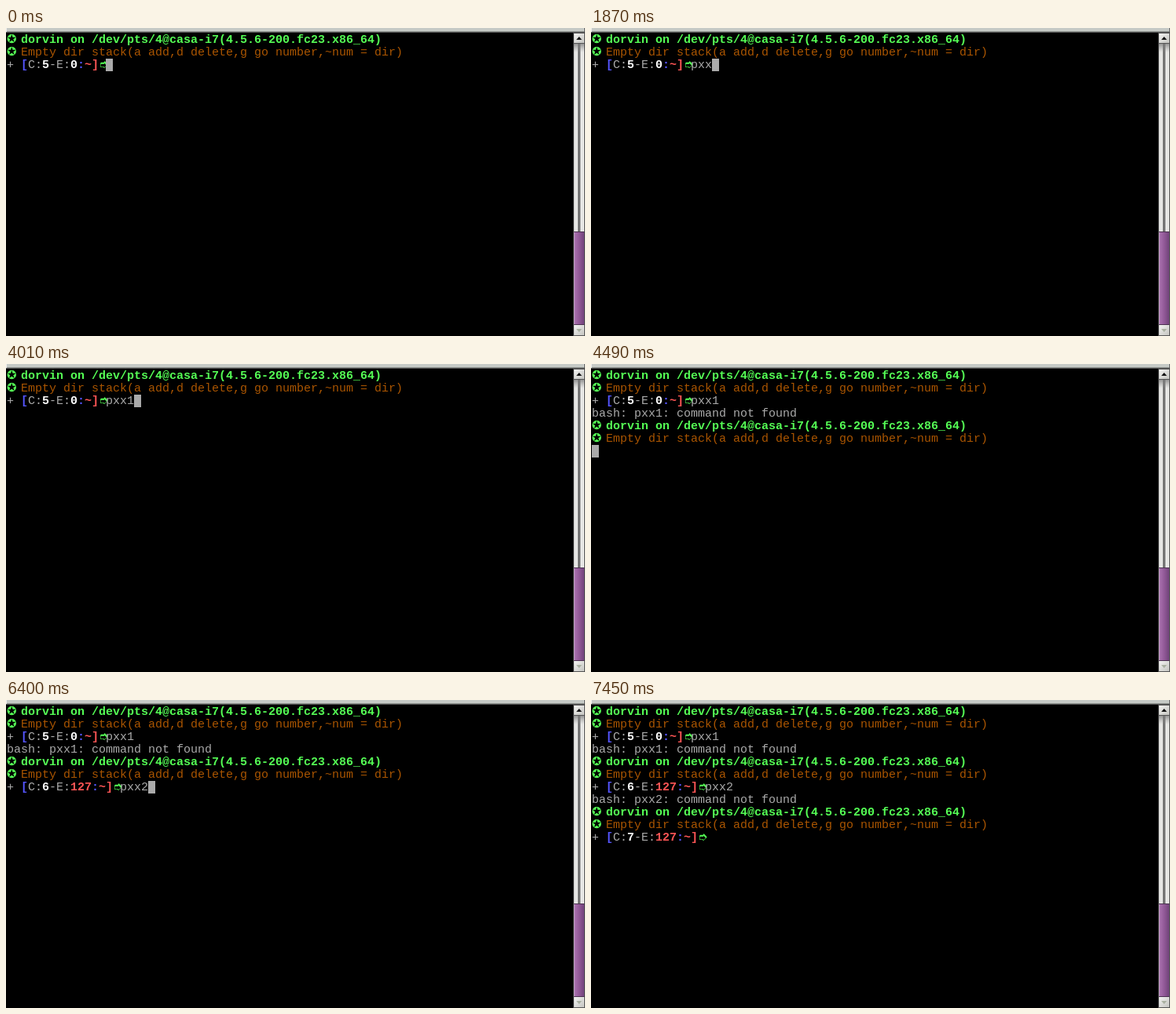
Write an HTML page that moves like this. It is 737 px wide and 392 px high and loops after 8000 ms.

```html
<!DOCTYPE html>
<html lang="en">
<head>
<meta charset="utf-8">
<title>Terminal session</title>
<style>
html, body { margin: 0; width: 100%; height: 100%; overflow: hidden; background: #000; }
svg { display: block; width: 737px; height: 392px; }
text { white-space: pre; font: 15px "Liberation Mono", monospace; }
.bold { font-weight: bold; }
.sign { font-family: "DejaVu Sans", sans-serif; }
</style>
</head>
<body>
<svg viewBox="0 0 737 392" xmlns="http://www.w3.org/2000/svg">
  <defs>
    <linearGradient id="thumb">
      <stop offset="0" stop-color="#ab74b0"/>
      <stop offset=".45" stop-color="#955c9b"/>
      <stop offset="1" stop-color="#71437a"/>
    </linearGradient>
    <linearGradient id="button" x2="1" y2="1">
      <stop offset="0" stop-color="#f4f4f2"/>
      <stop offset="1" stop-color="#c4c4c0"/>
    </linearGradient>
    <linearGradient id="shade" x2="0" y2="1">
      <stop offset="0" stop-color="#777" stop-opacity=".75"/>
      <stop offset="1" stop-color="#999" stop-opacity="0"/>
    </linearGradient>
  </defs>
  <rect width="737" height="392"/>
  <g id="screen"></g>
  <g shape-rendering="crispEdges">
    <rect width="737" height="4" fill="#c6cac6"/>
    <rect y="4" width="737" height="1" fill="#8e928e"/>
    <rect y="5" width="737" height="1" fill="#555"/>
    <rect width="1" height="5" fill="#eee"/>
    <rect x="736" width="1" height="5" fill="#666"/>
    <rect x="722" y="6" width="15" height="386" fill="#555"/>
    <rect x="723" y="7" width="13" height="384" fill="#e6e6e4"/>
    <rect x="728" y="20" width="3" height="240" fill="#555"/>
    <rect x="729" y="20" width="1" height="240" fill="#999"/>
    <rect x="723" y="20" width="13" height="11" fill="url(#shade)"/>
    <rect x="723" y="7" width="13" height="12" fill="url(#button)"/>
    <rect x="723" y="19" width="13" height="1" fill="#555"/>
    <rect x="723" y="259" width="13" height="1" fill="#4b3050"/>
    <rect x="723" y="260" width="13" height="118" fill="url(#thumb)"/>
    <rect x="723" y="260" width="1" height="118" fill="#c79bcc"/>
    <rect x="723" y="377" width="13" height="1" fill="#4b3050"/>
    <rect x="723" y="378" width="13" height="13" fill="url(#button)"/>
  </g>
  <path d="M726 15h7l-3.5-4z" fill="#111"/>
  <path d="M726 383h7l-3.5 4z" fill="#a9b0a0"/>
</svg>
<script>
const LOOP = 8000, CELL = 9, LINE = 16;
const GREEN = '#55ff55', BROWN = '#aa5500', GREY = '#aaaaaa',
      BLUE = '#5555ff', RED = '#ff5555', WHITE = '#ffffff';

const runs = [
  { start: 0, ready: 0, count: 5, code: '0', cmd: 'pxx1', keys: [1160, 1610, 1870, 4010] },
  { start: 4490, ready: 4530, count: 6, code: '127', cmd: 'pxx2', keys: [5080, 5330, 5460, 6400] },
  { start: 6890, ready: 6930, count: 7, code: '127', cmd: '', keys: [], slow: true }
];
const cursorOff = [[550, 1160], [2440, 3040], [3640, 4010], [6030, 6400], [7450, LOOP]];

const screen = document.getElementById('screen');
const left = col => 1 + col * CELL;
const top_ = row => 7 + row * LINE;

const write = (col, row, str, color, style = '') =>
  `<text x="${left(col)}" y="${top_(row) + 12}" fill="${color}" class="${style}">${str}</text>`;

const star = row => write(0, row, '✪', GREEN, 'bold sign');

// Writes the prompt and returns its markup with the column after it.
function prompt(row, { count, code }) {
  const parts = [
    ['+ ', GREY], ['[', BLUE, 'bold'], ['C:', GREY], [String(count), WHITE, 'bold'],
    ['-E:', GREY], [code, code === '0' ? WHITE : RED, 'bold'], [':', BLUE, 'bold'],
    ['~]', RED, 'bold'], ['➮', GREEN, 'bold sign']
  ];
  let col = 0, out = '';
  for (const [str, color, style] of parts) {
    out += write(col, row, str, color, style);
    col += str.length;
  }
  return [out, col];
}

function render(t) {
  let out = '', cursor;
  runs.forEach((run, i) => {
    if (t < run.start) return;
    const row = i * 4, ready = t >= run.ready;
    out += star(row) + star(row + 1);
    out += write(2, row, 'dorvin on /dev/pts/4@casa-i7(4.5.6-200.fc23.x86_64)', GREEN, 'bold');
    if (ready || !run.slow)
      out += write(2, row + 1, 'Empty dir stack(a add,d delete,g go number,~num = dir)', BROWN);
    if (!ready) {
      cursor = run.slow ? [2, row + 1] : [0, row + 2];
      return;
    }
    const [text, col] = prompt(row + 2, run);
    const typed = run.keys.filter(k => t >= k).length;
    out += text + write(col, row + 2, run.cmd.slice(0, typed), GREY);
    cursor = [col + typed, row + 2];
    const next = runs[i + 1];
    if (next && t >= next.start)
      out += write(0, row + 3, `bash: ${run.cmd}: command not found`, GREY);
  });
  if (!cursorOff.some(([a, b]) => t >= a && t < b))
    out += `<rect x="${left(cursor[0])}" y="${top_(cursor[1])}" width="${CELL}" height="${LINE}" fill="${GREY}"/>`;
  return out;
}

let shown = '';
function tick() {
  const out = render(performance.now() % LOOP);
  if (out !== shown) screen.innerHTML = shown = out;
  requestAnimationFrame(tick);
}
tick();
</script>
</body>
</html>
```
